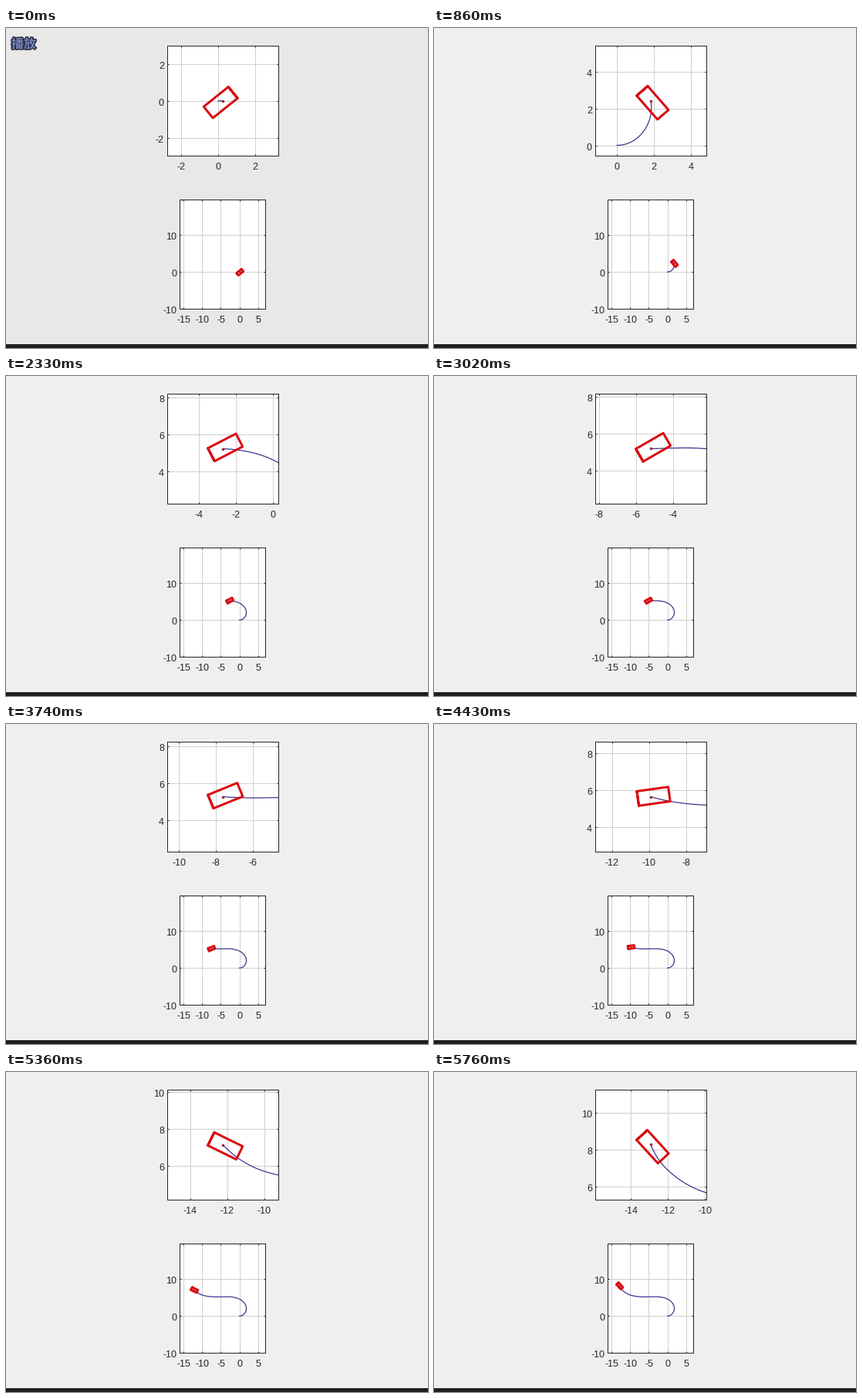
These frames come from a looping animation (547 by 416 pixels, 5.83 s). A matplotlib script:

```python
import numpy as np
import matplotlib.pyplot as plt
from matplotlib.animation import FuncAnimation
from matplotlib.patches import Rectangle
from matplotlib.patheffects import withStroke
from matplotlib.ticker import FuncFormatter, MultipleLocator
from matplotlib.transforms import ScaledTranslation

W, H, DPI = 547, 416, 100
PX = 72 / DPI  # points per pixel
LOOP_MS, SLOTS, PER_SLOT, SUB = 5830, 75, 4, 8
INK, GRID, RED, TRAIL = "#262626", "#d0d0d0", "#da0b12", "#362d8c"

plt.rcParams.update({"font.family": "Liberation Sans", "font.size": 12.5 * PX,
                     "axes.unicode_minus": False})

# step, x, y, course (deg), speed per step, slip angle (deg)
KEYS = np.array([
    (0, 0.25, 0.02, 8, 0.345, 30),
    (9, 1.83, 2.42, 100, 0.385, 31),
    (17, -0.17, 4.70, 157, 0.385, 31),
    (31, -5.20, 5.19, 181, 0.350, 29),
    (45, -9.90, 5.66, 163, 0.320, 25),
    (54, -12.23, 7.13, 133, 0.312, 21),
    (58, -12.92, 8.27, 111, 0.330, 21),
])
STEP, COURSE = KEYS[:, 0], np.radians(KEYS[:, 3])
POS = KEYS[:, 1:3]
VEL = KEYS[:, 4:5] * np.column_stack([np.cos(COURSE), np.sin(COURSE)])


def hermite(t):
    """Position on the driven path at time t, measured in steps."""
    i = np.clip(np.searchsorted(STEP, t, side="right") - 1, 0, len(STEP) - 2)
    span = (STEP[i + 1] - STEP[i])[:, None]
    s = (t - STEP[i])[:, None] / span
    return ((2 * s**3 - 3 * s**2 + 1) * POS[i] + (s**3 - 2 * s**2 + s) * span * VEL[i]
            + (3 * s**2 - 2 * s**3) * POS[i + 1] + (s**3 - s**2) * span * VEL[i + 1])


times = np.linspace(0, STEP[-1], int(STEP[-1]) * SUB + 1)
path = hermite(times)
delta = np.gradient(path, axis=0)
course = np.unwrap(np.arctan2(delta[:, 1], delta[:, 0]))
heading = course + np.radians(np.interp(times, STEP, KEYS[:, 5]))

HOLDS = np.floor(4.18 + 4.56 * np.arange(16))


def car_outline(center, angle):
    u = np.array([np.cos(angle), np.sin(angle)])
    n = np.array([-u[1], u[0]])
    mid = center - 0.15 * u
    corners = [(1, 1), (1, -1), (-1, -1), (-1, 1)]
    pts = [mid + 0.855 * a * u + 0.395 * b * n for a, b in corners]
    return np.array(pts + pts[:2])


fig = plt.figure(figsize=(W / DPI, H / DPI), dpi=DPI)
fig.add_artist(Rectangle((0, 0), 1, 5 / H, transform=fig.transFigure, color="#202020", lw=0))
hint = fig.text(7 / W, 1 - 19.5 / H, "播放", family="Noto Sans CJK JP", weight="bold",
                size=16 * PX, color="#7486c0", va="center_baseline",
                path_effects=[withStroke(linewidth=3 * PX, foreground="#2c2a3c")])


def make_plot(left, top, right, bottom, x_tick, y_tick):
    ax = fig.add_axes([left / W, 1 - bottom / H, (right - left) / W, (bottom - top) / H])
    ax.set_facecolor("white")
    ax.set_axisbelow(True)
    ax.grid(color=GRID, lw=PX)
    ax.tick_params(direction="in", length=2 * PX, width=PX, color=INK, labelcolor=INK,
                   top=True, right=True)
    ax.tick_params(axis="x", pad=9 * PX)
    ax.tick_params(axis="y", pad=4 * PX)
    for axis, tick in ((ax.xaxis, x_tick), (ax.yaxis, y_tick)):
        axis.set_major_locator(MultipleLocator(tick))
        axis.set_major_formatter(FuncFormatter(lambda v, _: str(round(v))))
    lower = ScaledTranslation(0, -1.5 / DPI, fig.dpi_scale_trans)
    for tick in ax.yaxis.get_major_ticks(8):
        tick.label1.set_transform(tick.label1.get_transform() + lower)
    for spine in ax.spines.values():
        spine.set(linewidth=PX, color=INK)
    trail, = ax.plot([], [], color=TRAIL, lw=1.2 * PX)
    car, = ax.plot([], [], color=RED, lw=3 * PX, solid_joinstyle="round",
                   solid_capstyle="round")
    return ax, trail, car


near, near_trail, near_car = make_plot(209, 23, 353, 166, 2, 2)
far, far_trail, far_car = make_plot(225, 223, 336, 365, 5, 10)
far.set_xlim(-16.1, 6.95)
far.set_ylim(-10, 19.7)
dot, = near.plot([], [], "o", ms=3.6 * PX, color="#a32440", mew=0)


def update(frame):
    slot = min((frame + 1) // PER_SLOT, SLOTS - 1)
    i = (slot - int(np.sum(HOLDS <= slot))) * SUB
    x, y = path[i]
    driven = np.vstack([(0, 0), path[:i + 1]])
    outline = car_outline(path[i], heading[i])
    for trail, car in ((near_trail, near_car), (far_trail, far_car)):
        trail.set_data(*driven.T)
        car.set_data(*outline.T)
    dot.set_data([x], [y])
    near.set_xlim(x - 3, x + 3)
    near.set_ylim(y - 2.98, y + 2.98)

    fade = min(slot / 3, 1)
    hint.set_alpha(1 - 0.9 * fade if slot < 9 else 0)
    fig.set_facecolor([(232 + 7 * fade) / 255] * 3)
    return near_trail, near_car, far_trail, far_car, dot, hint


FRAMES = SLOTS * PER_SLOT
anim = FuncAnimation(fig, update, frames=FRAMES, interval=LOOP_MS / FRAMES,
                     repeat=True, repeat_delay=0, blit=False)
plt.show()
```
